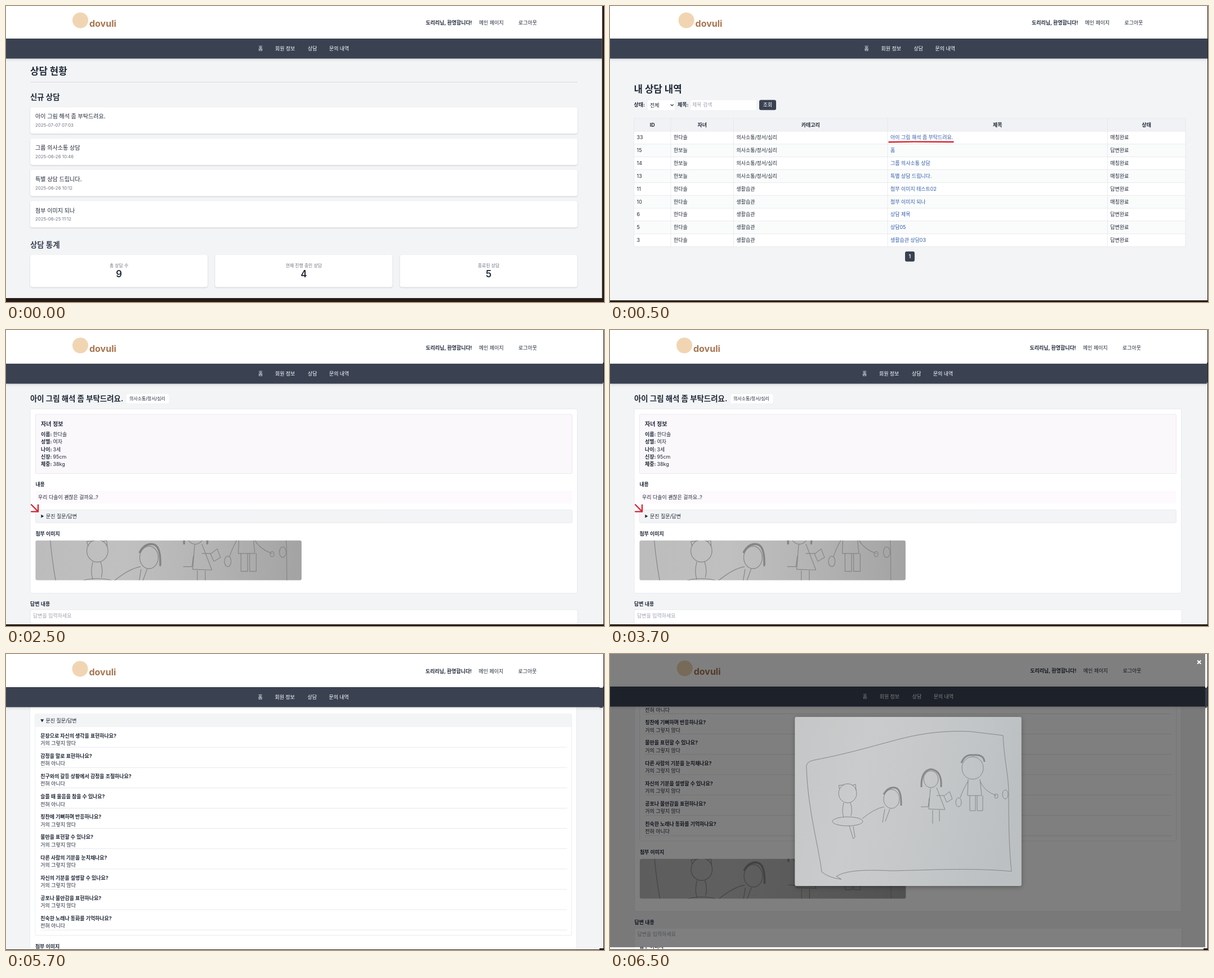
Recreate the animation shown at these times as an HTML page with a canvas. Size 1062 by 527 pixels, loop 8 s.

```html
<!DOCTYPE html>
<html lang="ko">
<head>
<meta charset="utf-8">
<title>상담 관리</title>
<style>
html, body { margin: 0; width: 100%; height: 100%; overflow: hidden; background: #261b17; }
canvas { display: block; }
</style>
</head>
<body>
<canvas id="stage" width="1062" height="527"></canvas>
<script>
const ctx = document.getElementById('stage').getContext('2d');
const FONT = 'Inter, "Noto Sans CJK KR", "Noto Sans CJK", "Noto Sans KR", sans-serif';
const INK = '#1f2937', NAVY = '#3a4252', GRAY = '#6b7280', PALE = '#9ca3af';
const PAGE = '#f3f4f6', LINE = '#e3e6ea', RED = '#d9202e', LINK = '#2f5ca8';
const BASE = 8.95, SMALL = 7.83, MID = 10.07, SUB = 13.43, BIG = 16.8;

const TOPIC = '의사소통/정서/심리', HABIT = '생활습관';
const KID_A = '한다솔', KID_B = '한보늘';
const ASK = '아이 그림 해석 좀 부탁드려요.';
const RARELY = '거의 그렇지 않다', NEVER = '전혀 아니다';
const MATCHED = '매칭완료', ANSWERED = '답변완료';

const recent = [
  [ASK, '2025-07-07 07:03'],
  ['그룹 의사소통 상담', '2025-06-26 10:46'],
  ['특별 상담 드립니다.', '2025-06-26 10:12'],
  ['첨부 이미지 되나', '2025-06-25 11:12']
];
const stats = [['총 상담 수', 9], ['현재 진행 중인 상담', 4], ['종료된 상담', 5]];
const rows = [
  [33, KID_A, TOPIC, ASK, MATCHED],
  [15, KID_B, TOPIC, '홈', ANSWERED],
  [14, KID_B, TOPIC, '그룹 의사소통 상담', MATCHED],
  [13, KID_B, TOPIC, '특별 상담 드립니다.', MATCHED],
  [11, KID_A, HABIT, '첨부 이미지 테스트02', ANSWERED],
  [10, KID_A, HABIT, '첨부 이미지 되나', MATCHED],
  [6, KID_A, HABIT, '상담 제목', ANSWERED],
  [5, KID_A, HABIT, '상담05', ANSWERED],
  [3, KID_A, HABIT, '생활습관 상담03', ANSWERED]
];
const questions = [
  ['문장으로 자신의 생각을 표현하나요?', RARELY],
  ['감정을 말로 표현하나요?', NEVER],
  ['친구와의 갈등 상황에서 감정을 조절하나요?', NEVER],
  ['슬플 때 울음을 참을 수 있나요?', NEVER],
  ['칭찬에 기뻐하며 반응하나요?', RARELY],
  ['불만을 표현할 수 있나요?', RARELY],
  ['다른 사람의 기분을 눈치채나요?', RARELY],
  ['자신의 기분을 설명할 수 있나요?', RARELY],
  ['공포나 불안감을 표현하나요?', RARELY],
  ['친숙한 노래나 동화를 기억하나요?', NEVER]
];

// y is the vertical middle of the glyphs; returns the text width
function text(str, x, y, size = BASE, weight = 400, color = INK, align = 'left') {
  ctx.font = `${weight} ${size}px ${FONT}`;
  ctx.fillStyle = color;
  ctx.textAlign = align;
  ctx.fillText(str, x, y + size * 0.37);
  return ctx.measureText(str).width;
}
const bold = (str, x, y, size, color) => text(str, x, y, size, 700, color);

function rect(x, y, w, h, color) {
  ctx.fillStyle = color;
  ctx.fillRect(x, y, w, h);
}
function box(x, y, w, h, r, fill, border) {
  ctx.beginPath();
  ctx.roundRect(x, y, w, h, r);
  ctx.fillStyle = fill;
  ctx.fill();
  if (border) {
    ctx.strokeStyle = border;
    ctx.lineWidth = 0.8;
    ctx.stroke();
  }
}
function shadowed(blur, dy, color, draw) {
  ctx.save();
  ctx.shadowColor = color;
  ctx.shadowBlur = blur;
  ctx.shadowOffsetY = dy;
  draw();
  ctx.restore();
}
function card(x, y, w, h) {
  shadowed(2.5, 1, 'rgba(0,0,0,.16)', () => box(x, y, w, h, 4, '#fff'));
}
function path(points, color, width, fill) {
  ctx.beginPath();
  points.forEach(([x, y]) => ctx.lineTo(x, y));
  if (fill) {
    ctx.fillStyle = color;
    ctx.fill();
    return;
  }
  ctx.strokeStyle = color;
  ctx.lineWidth = width;
  ctx.lineCap = 'round';
  ctx.stroke();
}

function header(dx, dy) {
  ctx.save();
  ctx.translate(0, dy);
  rect(0, -5, 1062, 63, '#fff');
  shadowed(5, 1, 'rgba(0,0,0,.15)', () => rect(0, 58, 1062, 35.6, NAVY));
  ctx.translate(dx, 0);
  ctx.beginPath();
  ctx.arc(132, 25.5, 14, 0, 7);
  ctx.fillStyle = '#f1d5b3';
  ctx.fill();
  bold('dovuli', 148, 31.5, 16, '#a8744f');
  bold('도리리님, 환영합니다!', 745.5, 30);
  text('메인 페이지', 840, 30);
  text('로그아웃', 910, 30);
  [['홈', 448], ['회원 정보', 478], ['상담', 536], ['문의 내역', 574]]
    .forEach(([label, x]) => text(label, x, 75.3, BASE, 500, '#fff'));
  ctx.restore();
}

function dashboard() {
  rect(0, 0, 1062, 527, PAGE);
  header(0, 0);
  bold('상담 현황', 43, 116, BIG);
  rect(43, 135, 972, 1, '#d9dce1');
  bold('신규 상담', 43, 162, SUB);
  recent.forEach(([title, date], i) => {
    const y = 180.2 + i * 55.7;
    card(43, y, 972, 47);
    text(title, 52, y + 16.5, MID, 500);
    text(date, 52, y + 32.3, SMALL, 400, GRAY);
  });
  bold('상담 통계', 43, 425, SUB, '#374151');
  stats.forEach(([label, n], i) => {
    const x = 43 + i * 328.3;
    card(x, 443, 315, 57.5);
    text(label, x + 157.5, 462, SMALL, 400, GRAY, 'center');
    text(n, x + 157.5, 477.2, BIG, 600, INK, 'center');
  });
}

function table() {
  const cols = [42.5, 108, 219.5, 493, 883.5, 1022], top = 200, step = 22.84;
  rows.forEach((row, r) => {
    const y = 223 + r * step;
    rect(42.5, y, 979.5, step, r % 2 ? '#fafcfc' : '#fff');
    row.forEach((cell, c) =>
      text(cell, cols[c] + 5, y + 11, BASE, 400, c === 3 ? LINK : INK));
  });
  rect(42.5, top, 979.5, 23, '#f1f2f5');
  ['ID', '자녀', '카테고리', '제목', '상태'].forEach((name, c) =>
    text(name, (cols[c] + cols[c + 1]) / 2, 211.3, BASE, 700, INK, 'center'));
  const bottom = 223 + rows.length * step;
  cols.forEach(x => rect(x - 0.4, top, 0.8, bottom - top, LINE));
  rect(42.5, top - 0.4, 979.5, 0.8, LINE);
  for (let r = 0; r <= rows.length; r++) rect(42.5, 222.6 + r * step, 979.5, 0.8, LINE);
}

function list() {
  rect(0, 0, 1062, 527, PAGE);
  header(3.6, 0);
  bold('내 상담 내역', 42.5, 147.5, BIG);
  bold('상태:', 42.5, 176);
  box(66, 167, 49.5, 19, 3, '#fff', '#eceef1');
  text('전체', 71, 176.5);
  path([[108, 175.4], [110.2, 177.6], [112.4, 175.4]], INK, 1.2);
  bold('제목:', 120, 176);
  box(142.5, 167, 118, 19, 3, '#fff', '#eceef1');
  text('제목 검색', 146, 176, BASE, 400, PALE);
  box(265, 167.3, 30, 18, 3, NAVY);
  text('조회', 280, 176, BASE, 500, '#fff', 'center');
  table();
  path([[495.5, 242.3], [540, 241.6], [609.5, 242]], RED, 2.4);
  box(524, 437, 17, 18, 3, NAVY);
  text('1', 532.5, 446, BASE, 600, '#fff', 'center');
}

// Line figures in the coordinates of the enlarged picture
const oval = (x, y, rx, ry) =>
  `M${x - rx} ${y}a${rx} ${ry} 0 1 0 ${2 * rx} 0a${rx} ${ry} 0 1 0 ${-2 * rx} 0`;
const sheet = new Path2D('M349 205Q346 192 362 189C430 176 480 160 520 150S600 136 640 138' +
  'L698 145C700 190 708 215 708 250S708 340 713 387C640 380 560 385 500 386' +
  'C460 384 420 384 402 396L411 401Q390 399 376 388C370 340 352 280 349 205');
const figures = new Path2D([
  oval(422, 248, 16, 17), 'M408 241L406 234L416 233M430 234L436 232L437 243',
  'M415 265q-4 15 0 26M427 265q4 12 1 23', oval(422, 298, 27, 8),
  'M425 306l7 23l3-3l-3-19M448 293Q470 275 487 272',
  oval(500, 258, 14, 17), 'M488 276l-4 24M497 276l-8 22',
  oval(570, 223, 13, 15), 'M569 239L566 276L595 277L580 238M580 252h14l9-7l5 13l-10 6l-5-11',
  'M573 278v24M585 278v20M567 256l-2 16h-13',
  oval(644, 203, 19, 20), 'M636 223L635 252H660L657 223M636 226Q625 245 622 256',
  'M657 226Q665 245 686 252M639 252v27h10v-27M652 252v27h10v-27',
  oval(619, 264, 5, 8), oval(686, 253, 3, 4), oval(702, 250, 5, 8)
].join(''));
const hair = new Path2D('M486 250Q494 236 506 238T517 270M553 237Q552 208 570 205' +
  'Q590 208 588 237M624 194Q630 178 645 180Q664 178 665 192');

function photo(x, y, w, h, tones, ink) {
  const g = ctx.createLinearGradient(x, y, x + w, y + h / 3);
  tones.forEach((c, i) => g.addColorStop(i / (tones.length - 1), c));
  box(x, y, w, h, 3, g);
  ctx.save();
  ctx.clip();
  ctx.translate(x + w / 2, y + h / 2);
  ctx.scale(w / 402, w / 402);
  ctx.translate(-529.5, -262.5);
  ctx.strokeStyle = ink;
  ctx.lineWidth = 1;
  ctx.stroke(sheet);
  ctx.stroke(figures);
  ctx.lineWidth = 3;
  ctx.stroke(hair);
  ctx.restore();
}

// Attachment and answer field; y is the middle of the first label
function attachment(x, y) {
  bold('첨부 이미지', x, y);
  photo(x, y + 11.8, 472.5, 70.8, ['#bcbcbc', '#c0c0c0', '#b3b3b3', '#a3a3a3'], '#858585');
  bold('답변 내용', x - 9.3, y + 125);
  box(x - 9.3, y + 135, 972, 60, 2, '#fff', LINE);
  text('답변을 입력하세요', x - 4.3, y + 146, BASE, 400, PALE);
}

function detail() {
  rect(0, 0, 1062, 527, PAGE);
  header(0, 2);
  const w = bold(ASK, 43, 122, SUB);
  box(43 + w + 6, 114, 75, 16.5, 3, '#fff');
  text(TOPIC, 43 + w + 11, 122.3, SMALL, 500);
  box(43, 140.5, 971.5, 328, 2, '#fff', LINE);
  box(52.4, 150, 953, 105.5, 2, '#fbf8fc', '#e8e3ea');
  bold('자녀 정보', 62, 166.8, MID);
  [['이름:', KID_A], ['성별:', '여자'], ['나이:', '3세'], ['신장:', '95cm'], ['체중:', '38kg']]
    .forEach(([label, value], i) => {
      const y = 185.3 + i * 13.45;
      text(value, 62 + bold(label + ' ', 62, y), y);
    });
  bold('내용', 52.4, 275);
  box(52.4, 287, 953, 21.5, 2, '#fdf9fd');
  text('우리 다솔이 괜찮은 걸까요..?', 57, 297.6);
  box(52.4, 320.3, 953, 23, 2, PAGE, LINE);
  path([[62.3, 328.5], [67.3, 331.5], [62.3, 334.5]], INK, 0, true);
  text('문진 질문/답변', 71, 331.5);
  path([[45, 311], [56.8, 323]], RED, 2.3);
  path([[57, 311.5], [57, 323.3], [45, 323.3]], RED, 2.3);
  attachment(52.4, 363);
}

function answers(dx, dy, headX, headY) {
  rect(0, 0, 1062, 527, PAGE);
  ctx.save();
  ctx.translate(dx, dy);
  box(42.5, -40, 971, 666.5, 2, '#fff', LINE);
  box(51.7, 107, 953, 394, 2, '#fff', LINE);
  rect(52, 107.5, 952.4, 22.5, PAGE);
  path([[61.2, 116.3], [67.2, 116.3], [64.2, 121.5]], INK, 0, true);
  text('문진 질문/답변', 70.5, 118.7);
  questions.forEach(([q, a], i) => {
    const y = 145.4 + i * 36.15;
    bold(q, 61.3, y);
    text(a, 61.3, y + 13.4);
    rect(61.3, y + 20.2, 935, 0.8, '#dfe3e8');
  });
  attachment(51.9, 521);
  ctx.restore();
  header(headX, headY);
}

function viewer() {
  answers(1, -168, 0.7, 0);
  rect(0, 0, 1062, 527, 'rgba(0,0,0,.5)');
  shadowed(8, 2, 'rgba(0,0,0,.3)', () => box(328.5, 112, 402, 301, 3, '#c5c7c8'));
  photo(328.5, 112, 402, 301, ['#c5c6c6', '#cacbcc', '#c4c7c8', '#bcc0c2'], '#858789');
  path([[1043.8, 12], [1048.8, 17]], '#fff', 2);
  path([[1048.8, 12], [1043.8, 17]], '#fff', 2);
}

// Each view covers only its own width and height; earlier ones stay visible at the edges
const views = [
  { at: 0, w: 1058.5, h: 520, draw: dashboard },
  { at: 500, w: 1061, h: 524, draw: list },
  { at: 2500, w: 1060, h: 524, draw: detail },
  { at: 4500, w: 1054, h: 526, draw: () => answers(0, 0, -0.5, 1) },
  { at: 6500, w: 1057, h: 522, draw: viewer }
];
let shown = -1;

function render() {
  const t = performance.now() % 8000;
  const now = views.filter(v => v.at <= t).length;
  if (now !== shown) {
    shown = now;
    rect(0, 0, 1062, 527, '#261b17');
    views.slice(0, now).forEach(v => {
      ctx.save();
      ctx.beginPath();
      ctx.rect(0, 0, v.w, v.h);
      ctx.clip();
      v.draw();
      ctx.restore();
    });
  }
  requestAnimationFrame(render);
}
render();
</script>
</body>
</html>
```
